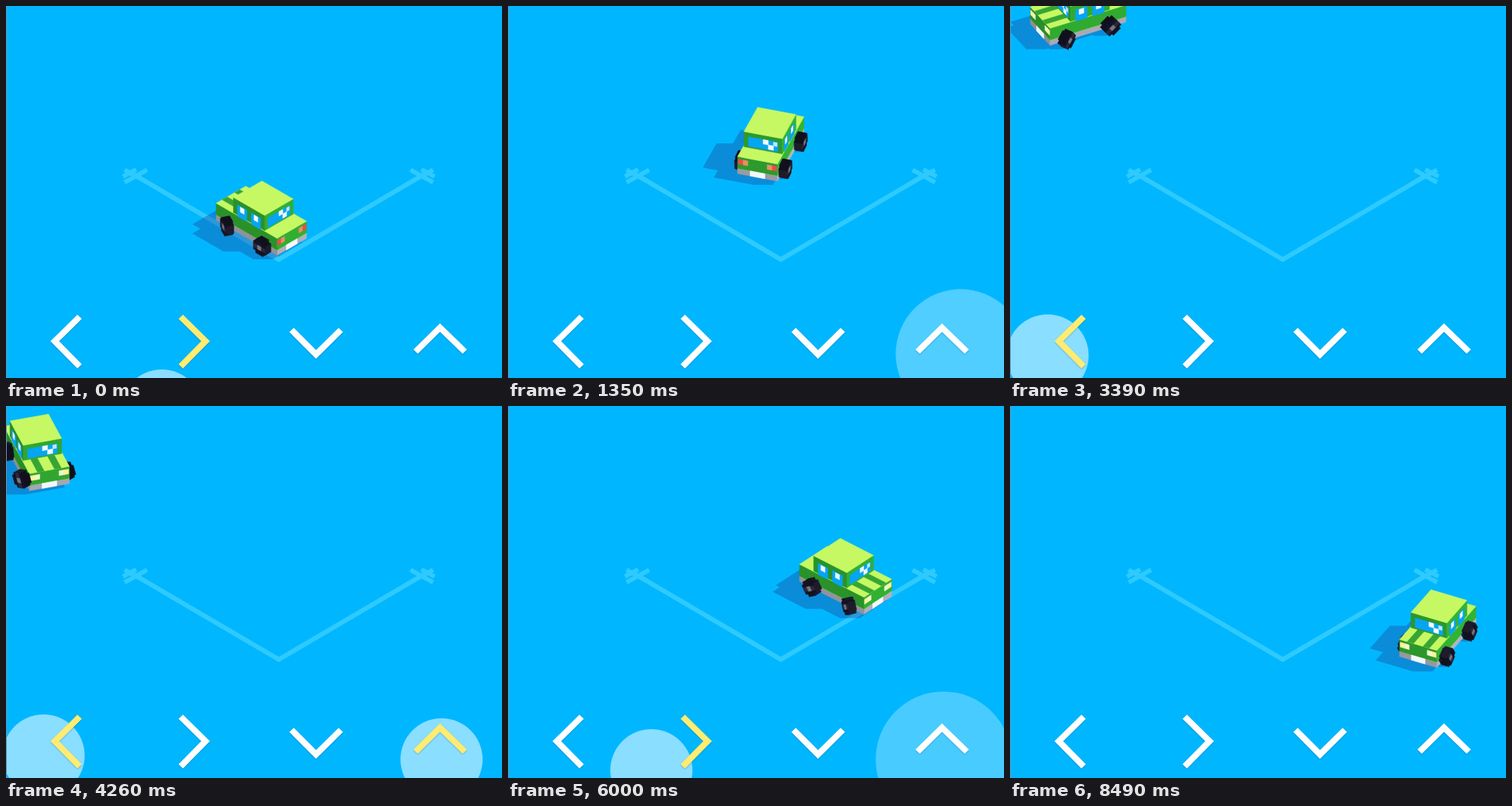
Write an HTML page with a canvas that moves like this. It is 640 px wide and 480 px high and loops after 8520 ms.

```html
<!DOCTYPE html>
<html lang="en">
<head>
<meta charset="utf-8">
<title>Blocky car with touch controls</title>
<style>
html, body { margin: 0; width: 100%; height: 100%; overflow: hidden; background: #00b7ff; }
canvas { display: block; }
</style>
</head>
<body>
<canvas id="stage" width="640" height="480"></canvas>
<script>
const ctx = document.getElementById('stage').getContext('2d');
const LOOP = 8520, STEP = 30, RAD = Math.PI / 180;
const TILT = 0.577, RISE = 0.816;

// time, ground x, ground y, heading in degrees, speed in px/s
const ROUTE = [
  [0, 332, 294.5, 225, 15],
  [870, 322, 256, 272, 190],
  [1350, 338, 197.5, 288, 210],
  [1740, 344, 151, 284, 195],
  [2220, 332, 103.5, 253, 200],
  [3390, 91, 26, 152, 130],
  [5010, 120.5, 141.5, 35.6, 270],
  [6000, 433, 239.5, 41.5, 230],
  [6960, 508, 277, 58, 75],
  [7830, 546, 298, 100, 28],
  [8490, 553.5, 305, 117, 8],
  [8520, 553.5, 305, 117, 8]
];

// button, pressed, released, finger x, finger y
const TOUCHES = [
  ['right', -100, 480, 201, 522],
  ['up', 240, 1222, 584, 449],
  ['left', 1650, 4980, 48.5, 451],
  ['up', 1760, 2680, 578, 446],
  ['up', 3700, 5856, 562, 456],
  ['right', 5890, 6450, 185, 470],
  ['right', 7020, 7450, 185, 470]
];

const ARROWS = {
  left: [[95, 401], [63, 432.5], [95, 465]],
  right: [[225.5, 401], [257.5, 432.5], [225.5, 465]],
  down: [[368.5, 418], [400, 449.5], [432, 418]],
  up: [[528.5, 446], [560, 415], [592, 446]]
};

const LIME = '#c6f863', STRIPE = '#36a534', GLASS = '#05a5f2', WHITE = '#f2f8ff';
const GREEN = [46, 160, 46], GREY = [160, 160, 172];

// car ends, half widths and wheel axles along its length
const NOSE = 59, TAIL = -52, CAB = 28.5, BODY_W = 27, CAB_W = 26;
const AXLES = [-28, 36], WHEEL_R = 30, WHEEL_Z = 10;

function hermite(a, b, ma, mb, p) {
  const q = p * p, c = q * p;
  return a * (2 * c - 3 * q + 1) + ma * (c - 2 * q + p) + b * (3 * q - 2 * c) + mb * (c - q);
}

function turnRate(i) {
  if (i < 1 || i > ROUTE.length - 2) return 0;
  const rate = k => (ROUTE[k + 1][3] - ROUTE[k][3]) / (ROUTE[k + 1][0] - ROUTE[k][0]);
  const a = rate(i - 1), b = rate(i);
  return a * b > 0 ? 2 * a * b / (a + b) : 0;
}

function poseAt(t) {
  let i = 0;
  while (i < ROUTE.length - 2 && t >= ROUTE[i + 1][0]) i++;
  const A = ROUTE[i], B = ROUTE[i + 1], span = B[0] - A[0], p = (t - A[0]) / span;
  const run = (K, fn) => K[4] * span / 1000 * fn(K[3] * RAD);
  return {
    x: hermite(A[1], B[1], run(A, Math.cos), run(B, Math.cos), p),
    y: hermite(A[2], B[2], run(A, Math.sin) * TILT, run(B, Math.sin) * TILT, p),
    heading: hermite(A[3], B[3], turnRate(i) * span, turnRate(i + 1) * span, p) * RAD
  };
}

// distance driven at each step, for the rolling wheels
const driven = [0];
for (let t = STEP; t < LOOP; t += STEP) {
  const a = poseAt(t - STEP), b = poseAt(t);
  driven.push(driven[driven.length - 1] + Math.hypot(b.x - a.x, (b.y - a.y) / TILT));
}

function steerAt(t) {
  let sum = 0;
  for (const [name, on, off] of TOUCHES) {
    if (name === 'up') continue;
    const amount = Math.max(0, Math.min(1, (t - on) / 100, (off + 100 - t) / 100));
    sum += (name === 'left' ? -0.45 : 0.45) * amount;
  }
  return sum;
}

function trace(points, close) {
  points.forEach(([x, y], i) => i ? ctx.lineTo(x, y) : ctx.moveTo(x, y));
  if (close) ctx.closePath();
}

function fill(points, color) {
  ctx.beginPath();
  trace(points, true);
  ctx.fillStyle = ctx.strokeStyle = color;
  ctx.lineWidth = 0.5;
  ctx.fill();
  ctx.stroke();
}

function line(points, width, color) {
  ctx.beginPath();
  trace(points);
  ctx.lineWidth = width;
  ctx.strokeStyle = color;
  ctx.stroke();
}

function hull(points) {
  points.sort((a, b) => a[0] - b[0] || a[1] - b[1]);
  const half = list => {
    const out = [];
    for (const p of list) {
      while (out.length > 1) {
        const a = out[out.length - 2], b = out[out.length - 1];
        if ((b[0] - a[0]) * (p[1] - a[1]) - (b[1] - a[1]) * (p[0] - a[0]) > 0) break;
        out.pop();
      }
      out.push(p);
    }
    out.pop();
    return out;
  };
  return half(points).concat(half(points.slice().reverse()));
}

function drawCar(t) {
  const { x, y, heading } = poseAt(t);
  const steer = steerAt(t), spin = -driven[t / STEP] / 11;
  const c = Math.cos(heading), s = Math.sin(heading);

  // f: forward, r: to the right, z: up
  const project = (f, r, z) => [x + f * c - r * s, y + (f * s + r * c) * TILT - z * RISE];
  const cast = (f, r, z) => [x + f * c - r * s - 0.93 * z, y + (f * s + r * c) * TILT];

  const tint = (rgb, normalX) => {
    const k = 1 + 0.13 * normalX;
    return `rgb(${rgb.map(v => Math.min(255, Math.round(v * k))).join()})`;
  };
  const endPanel = (f, r0, r1, z0, z1, color) =>
    fill([project(f, r0, z0), project(f, r1, z0), project(f, r1, z1), project(f, r0, z1)], color);
  const sidePanel = (r, f0, f1, z0, z1, color) =>
    fill([project(f0, r, z0), project(f1, r, z0), project(f1, r, z1), project(f0, r, z1)], color);
  const topPanel = (z, f0, f1, r0, r1, color) =>
    fill([project(f0, r0, z), project(f1, r0, z), project(f1, r1, z), project(f0, r1, z)], color);

  const end = s > 0 ? 1 : -1, side = c > 0 ? 1 : -1;

  function box(f0, f1, w, z0, z1, rgb) {
    endPanel(end > 0 ? f1 : f0, -w, w, z0, z1, tint(rgb, end * c));
    sidePanel(side * w, f0, f1, z0, z1, tint(rgb, -side * s));
    topPanel(z1, f0, f1, -w, w, LIME);
  }

  // a wheel is two crossed blocks, which leaves the corners notched
  function wheel(f, r) {
    const turn = f > 0 ? steer : 0, w = heading + turn;
    const ct = Math.cos(turn), st = Math.sin(turn);
    const at = (df, dr, dz) => project(f + df * ct - dr * st, r + df * st + dr * ct, WHEEL_Z + dz);
    const rolled = (a, b, dr) => at(a * Math.cos(spin) - b * Math.sin(spin), dr,
      a * Math.sin(spin) + b * Math.cos(spin));
    const R = 10.5, N = 6.5, W = 5.5, face = Math.cos(w) > 0 ? W : -W;

    for (const [long, wide] of [[N, R], [R, N]]) {
      for (let k = 0; k < 4; k++) {
        const a = spin + k * Math.PI / 2;
        if (Math.cos(a) * Math.sin(w) * RISE + Math.sin(a) * TILT <= 0) continue;
        const [out, half] = k % 2 ? [wide, long] : [long, wide];
        const q = k * Math.PI / 2, cq = Math.cos(q), sq = Math.sin(q);
        const edge = (h, dr) => rolled(out * cq - h * sq, out * sq + h * cq, dr);
        fill([edge(-half, -W), edge(half, -W), edge(half, W), edge(-half, W)],
          k % 2 ? '#11101e' : '#1d1b2c');
      }
    }
    const cell = (a0, a1, b0, b1, color) => fill([rolled(a0, b0, face), rolled(a1, b0, face),
      rolled(a1, b1, face), rolled(a0, b1, face)], color);
    cell(-R, R, -N, N, '#151322');
    cell(-N, N, -R, R, '#151322');
    cell(-R, -3, -3, 3, '#2b2939');
    cell(3, R, -3, 3, '#2b2939');
    cell(-3.2, 3.2, -3.2, 3.2, '#777583');
  }

  function shadow() {
    ctx.beginPath();
    const solid = (f0, f1, r0, r1, z0, z1) => {
      const pts = [];
      for (const f of [f0, f1]) for (const r of [r0, r1]) for (const z of [z0, z1]) pts.push(cast(f, r, z));
      trace(hull(pts), true);
    };
    solid(TAIL, NOSE, -BODY_W, BODY_W, 6, 33);
    solid(-CAB, CAB, -CAB_W, CAB_W, 30, 57);
    for (const f of AXLES) for (const r of [-WHEEL_R, WHEEL_R]) solid(f - 8, f + 8, r - 5, r + 5, 1, 19);
    ctx.fillStyle = 'rgba(35,40,130,.3)';
    ctx.fill();
  }

  function wheels(sign) {
    const order = s > 0 ? AXLES : AXLES.slice().reverse();
    order.forEach(f => wheel(f, sign * WHEEL_R));
  }

  shadow();
  wheels(-side);
  box(TAIL, NOSE, BODY_W, 6, 14.5, GREY);
  box(TAIL, NOSE, BODY_W, 14.5, 33, GREEN);
  for (const r of [-16, 7]) topPanel(33, CAB, NOSE, r, r + 9, STRIPE);

  const face = end > 0 ? NOSE : TAIL;
  endPanel(face, -10, 10, 6, 14, WHITE);
  for (const k of [-1, 1]) {
    endPanel(face, k * 19.5, k * 26, 21.5, 29, end > 0 ? '#fff29b' : '#f2484b');
    endPanel(face, k * 13, k * 19.5, 21.5, 29, end > 0 ? '#f0fbc8' : '#e69061');
  }

  box(-CAB, CAB, CAB_W, 33, 57, GREEN);
  const pane = end * CAB;
  endPanel(pane, -20, 20, 35, 50, GLASS);
  endPanel(pane, 0, -7 * end, 43, 50, WHITE);
  endPanel(pane, -7 * end, -14 * end, 36, 43, WHITE);
  endPanel(pane, -14 * end, -19 * end, 43, 49, '#bfe9ff');
  for (const f of [-21, 4]) {
    sidePanel(side * CAB_W, f, f + 17, 31, 49, GLASS);
    sidePanel(side * CAB_W, f + 5, f + 12, 40, 48, WHITE);
  }
  wheels(side);
}

function drawAxes() {
  const ink = '#2ecaff';
  line([[165, 217.5], [352, 327], [539, 217.5]], 6, ink);
  for (const flip of [false, true]) {
    const at = (px, py) => [flip ? 704 - px : px, py];
    line([at(153, 227.5), at(182, 211.5)], 5.5, ink);
    line([at(151, 220), at(168, 211)], 5.5, ink);
    line([at(153, 211.5), at(180, 226)], 5.5, ink);
  }
}

function drawControls(t) {
  const active = {};
  for (const [name, on, off, x, y] of TOUCHES) {
    const p = Math.max(0, (t - off) / 300);
    if (t < on || p >= 1) continue;
    if (t < off) active[name] = true;
    ctx.beginPath();
    ctx.arc(x, y, 53 + 72 * p, 0, 7);
    ctx.fillStyle = `rgba(255,255,255,${0.54 * (1 - p)})`;
    ctx.fill();
  }
  ctx.save();
  ctx.shadowColor = 'rgba(0,40,90,.25)';
  ctx.shadowBlur = 2;
  ctx.shadowOffsetY = 1;
  for (const name in ARROWS) line(ARROWS[name], 8, active[name] ? '#ffec70' : '#fff');
  ctx.restore();
}

function draw(t) {
  ctx.fillStyle = '#00b7ff';
  ctx.fillRect(0, 0, 640, 480);
  drawAxes();
  drawCar(t);
  drawControls(t);
  ctx.fillStyle = '#6593b3';
  ctx.fillRect(0, 0, 1, 480);
}

const start = performance.now();
function tick() {
  const t = (performance.now() - start) % LOOP;
  draw(Math.floor(t / STEP) * STEP);
  requestAnimationFrame(tick);
}
tick();
</script>
</body>
</html>
```
